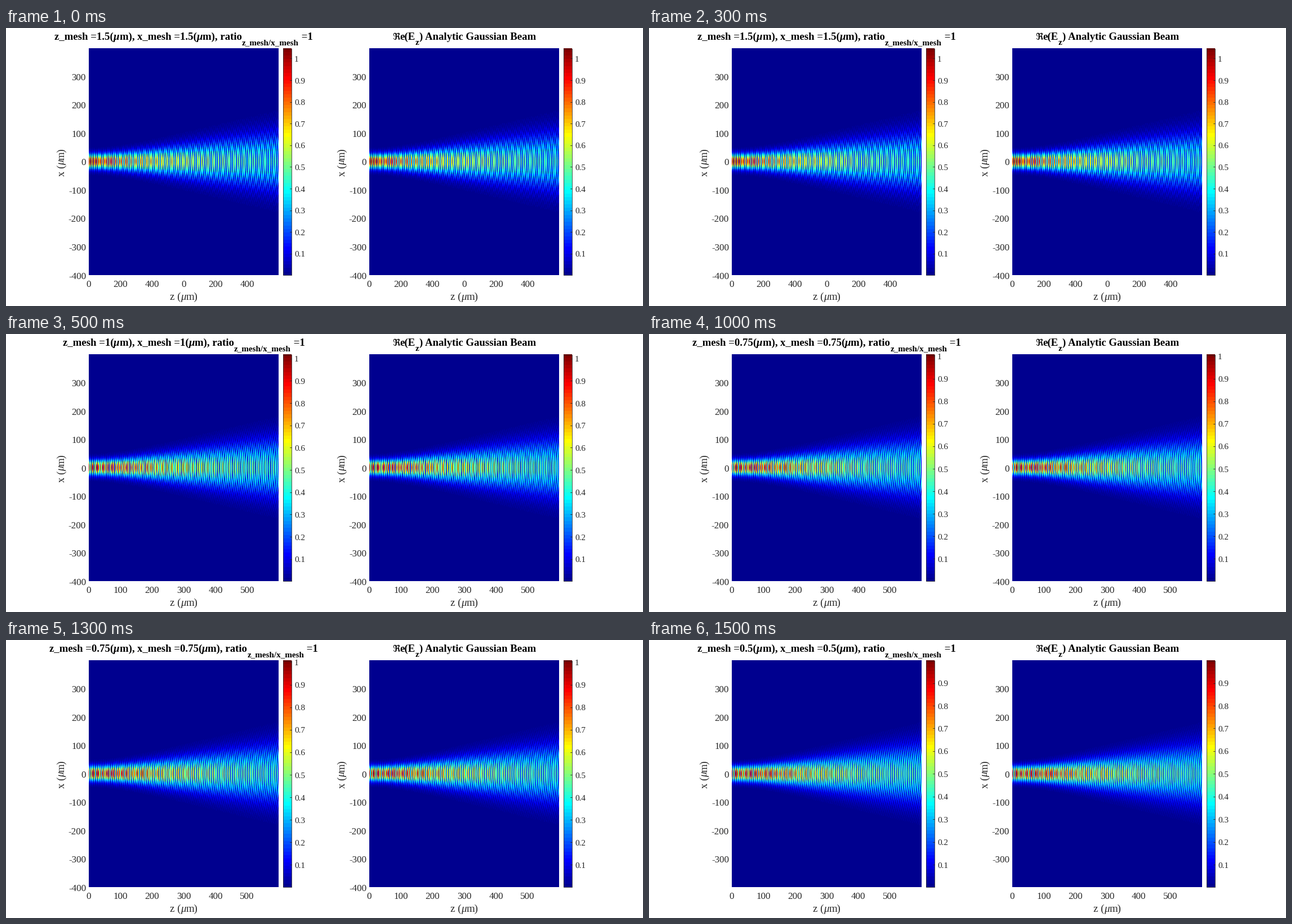
A matplotlib script that plays this animation: 1131x495 px, repeating every 2000 ms.

```python
import numpy as np
import matplotlib.pyplot as plt
from matplotlib.animation import FuncAnimation
from matplotlib.colors import ListedColormap
from matplotlib.patches import Rectangle

W, H, DPI = 1131, 495, 64
PT = 72 / DPI                      # points per pixel
TOP, BOTTOM, PLOT_W = 37, 440.4, 337
PANELS = (147, 645)
INK = "#262626"

WAVELENGTH, WAIST = 12.0, 24.0     # micrometres
# mesh step, first x, last x, last z, colour limit, z tick labels
STEPS = [
    (1.5, -400, 398, 598.5, 1.045, (0, 200, 400, 0, 200, 400)),
    (1, -400, 399, 599, 1.017, range(0, 600, 100)),
    (0.75, -400, 398.75, 599.25, 1.006, range(0, 600, 100)),
    (0.5, -399.5, 399.5, 599.5, 0.998, range(0, 600, 100)),
]

level = np.arange(1, 65)
ramp = lambda c: np.clip(1.5 - abs(level - c) / 16, 0, 1)
JET = ListedColormap(np.column_stack([ramp(48), ramp(32), ramp(16)]))

plt.rcParams["font.family"] = "Liberation Serif"
fig = plt.figure(figsize=(W / DPI, H / DPI), dpi=DPI, facecolor="white")
ax = fig.add_axes([0, 0, 1, 1])
widths = {}


def beam(step, x0, x1, z1):
    """Magnitude of the real part of a two-dimensional Gaussian beam."""
    z = np.arange(0, z1 + step / 2, step)
    x = np.arange(x0, x1 + step / 2, step)[::-1, None]
    k = 2 * np.pi / WAVELENGTH
    zr = np.pi * WAIST**2 / WAVELENGTH
    w = WAIST * np.sqrt(1 + (z / zr) ** 2)
    phase = k * z + k * x**2 * z / (2 * (z**2 + zr**2)) - np.arctan(z / zr) / 2
    return np.sqrt(WAIST / w) * np.exp(-((x / w) ** 2)) * abs(np.cos(phase))


def label(x, y, text, size, ha="left", **kw):
    kw.setdefault("color", INK)
    return ax.text(x, y, text, fontsize=size * PT, ha=ha, va="baseline",
                   rotation_mode="anchor", **kw)


def advance(text, size, **kw):
    key = (text, size, tuple(sorted(kw.items())))
    if key not in widths:
        both = []
        for sample in ("|" + text + "|", "||"):
            t = label(0, 0, sample, size, **kw)
            both.append(t.get_window_extent().width)
            t.remove()
        widths[key] = both[0] - both[1]
    return widths[key]


def rich(cx, cy, runs, upright=True, **kw):
    """Centre a line of (text, size, drop, style) runs on a point."""
    parts = []
    for text, size, drop, style in runs:
        opts = {**kw, **style}
        parts.append((text, size, drop, opts, advance(text, size, **opts)))
    pos = -sum(p[-1] for p in parts) / 2
    for text, size, drop, opts, width in parts:
        if upright:
            label(cx + pos, cy + drop, text, size, **opts)
        else:
            label(cx + drop, cy - pos, text, size, rotation=90, **opts)
        pos += width


def with_unit(before, after, size):
    return [(before + "(", size, 0, {}),
            ("μ", size, 0, {"fontstyle": "italic"}),
            ("m)" + after, size, 0, {})]


def panel(left, data, x0, x1, z1, vmax, z_labels):
    right = left + PLOT_W
    ax.imshow(data, extent=(left, right, BOTTOM, TOP), cmap=JET, vmin=0,
              vmax=vmax, aspect="auto", interpolation="nearest")
    for i, name in enumerate(z_labels):
        label(left + 100 * i / z1 * PLOT_W, 461.3, str(name), 17, "center")
    for x in range(-400, 400, 100):
        if x >= x0:
            y = BOTTOM - (x - x0) / (x1 - x0) * (BOTTOM - TOP)
            label(left - 5, y + 6.2, str(x), 17, "right")
    rich(left + PLOT_W / 2, 484, with_unit("z ", "", 18.8))
    rich(left - 43.5, 239, with_unit("x ", "", 18.8), upright=False)

    bar, bar_w = right + 8, 14.5
    ax.imshow(level[::-1, None], extent=(bar, bar + bar_w, BOTTOM, TOP),
              cmap=JET, aspect="auto", interpolation="nearest")
    ax.add_patch(Rectangle((bar, TOP), bar_w, BOTTOM - TOP, fill=False,
                           ec=INK, lw=0.8 * PT))
    for n in range(1, int(vmax * 10) + 1):
        y = BOTTOM - n / 10 / vmax * (BOTTOM - TOP)
        ax.plot([bar + bar_w - 3, bar + bar_w], [y, y], color=INK, lw=0.8 * PT)
        label(bar + 20, y + 5.6, f"{n / 10:g}", 15.3)


def draw(i):
    ax.clear()
    ax.axis("off")
    step, x0, x1, z1, vmax, z_labels = STEPS[i]
    data = beam(step, x0, x1, z1)
    for left in PANELS:
        panel(left, data, x0, x1, z1, vmax, z_labels)

    bold = {"fontweight": "bold", "color": "black"}
    size, sub = 18.8, 15.1
    rich(PANELS[0] + PLOT_W / 2, 20.8,
         with_unit(f"z_mesh ={step:g}", ", ", size)
         + with_unit(f"x_mesh ={step:g}", ", ratio", size)
         + [("z_mesh/x_mesh", sub, 9, {}), (" =1", size, 0, {})], **bold)
    rich(PANELS[1] + PLOT_W / 2, 20.8,
         [("ℜ", 16.5, 0, {"fontfamily": "DejaVu Sans"}), ("e(E", size, 0, {}),
          ("z", sub, 9, {}), (") Analytic Gaussian Beam", size, 0, {})], **bold)
    ax.set_xlim(0, W)
    ax.set_ylim(H, 0)
    return []


anim = FuncAnimation(fig, draw, frames=len(STEPS), interval=500,
                     init_func=lambda: [], repeat=True, repeat_delay=0)
plt.show()
```
